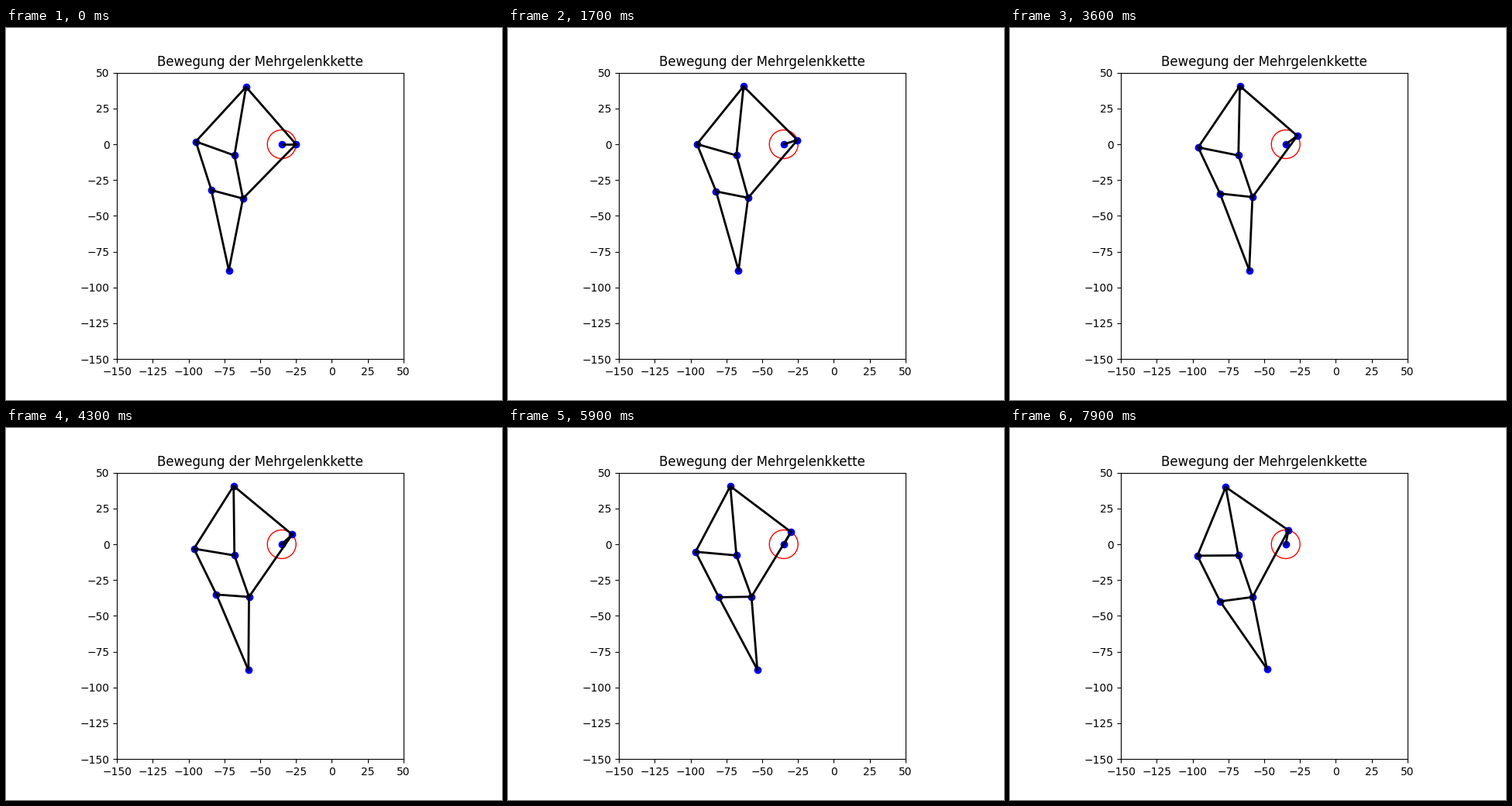
A matplotlib script for the animation above (8000 ms loop, 640 px wide and 480 px high).

```python
import numpy as np
import matplotlib.pyplot as plt
from matplotlib.animation import FuncAnimation

FRAMES = 80
INTERVAL = 100  # ms

HUB = np.array([-35.0, 0.0])
PIVOT = np.array([-68.0, -7.8])
CRANK = 10.0

BARS = [
    ("hub", "crank"), ("crank", "top"), ("crank", "knee"),
    ("pivot", "top"), ("pivot", "left"), ("top", "left"),
    ("pivot", "knee"), ("left", "ankle"), ("ankle", "knee"),
    ("ankle", "foot"), ("knee", "foot"),
]


def meet(p, q, rp, rq):
    """Intersection of two circles, on the left of the way from p to q."""
    d = np.hypot(*(q - p))
    u = (q - p) / d
    a = (rp**2 - rq**2 + d**2) / (2 * d)
    h = np.sqrt(max(rp**2 - a**2, 0.0))
    return p + a * u + h * np.array([-u[1], u[0]])


def solve(angle):
    crank = HUB + CRANK * np.array([np.cos(angle), np.sin(angle)])
    top = meet(PIVOT, crank, 48.5, 53.1)
    left = meet(PIVOT, top, 28.65, 51.8)
    knee = meet(crank, PIVOT, 53.0, 30.7)
    ankle = meet(knee, left, 22.8, 35.65)
    foot = meet(knee, ankle, 51.1, 57.3)
    return dict(hub=HUB, pivot=PIVOT, crank=crank, top=top, left=left,
                knee=knee, ankle=ankle, foot=foot)


fig, ax = plt.subplots(figsize=(6.4, 4.8), dpi=100)
ax.set_xlim(-150, 50)
ax.set_ylim(-150, 50)
ax.set_aspect("equal")
ax.set_title("Bewegung der Mehrgelenkkette")
ax.add_patch(plt.Circle(HUB, CRANK, color="r", fill=False))

joints, = ax.plot([], [], "bo")
bars = [ax.plot([], [], "k-", lw=2)[0] for _ in BARS]


def update(frame):
    pts = solve(np.radians(frame))
    joints.set_data(*np.array(list(pts.values())).T)
    for line, (a, b) in zip(bars, BARS):
        line.set_data(*np.array([pts[a], pts[b]]).T)
    return [joints, *bars]


anim = FuncAnimation(fig, update, frames=FRAMES, init_func=lambda: update(0),
                     interval=INTERVAL, repeat=True, repeat_delay=0)
plt.show()
```
